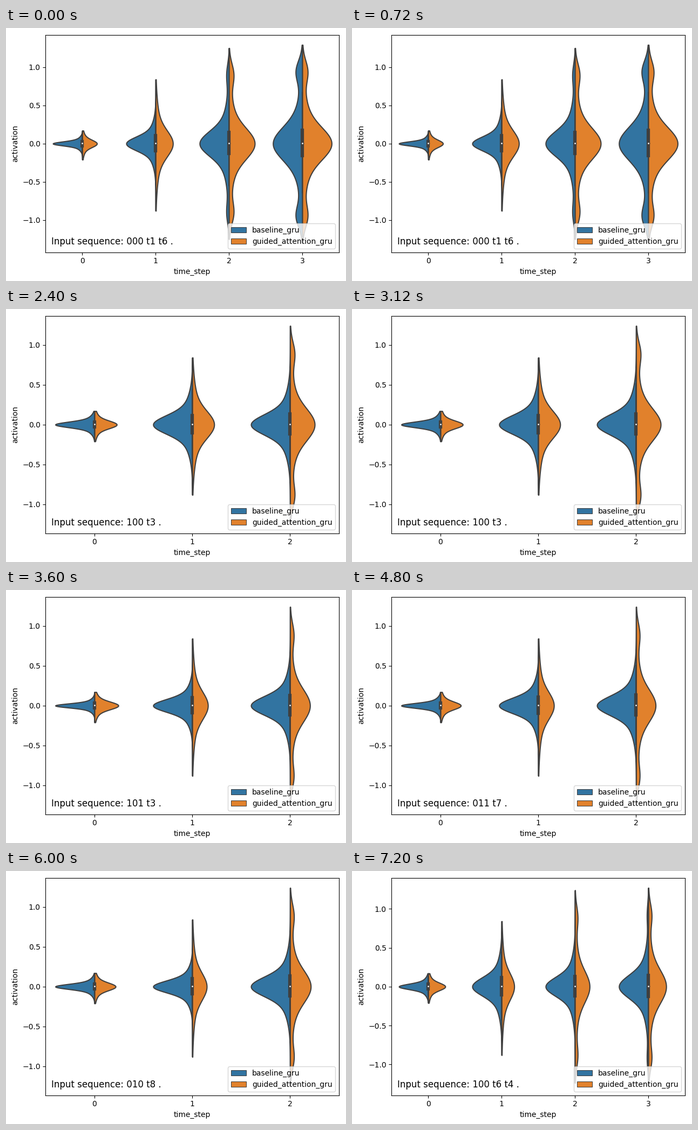
Animation, 630 px wide and 470 px high, one loop 8000 ms. Source, as a matplotlib script:

```python
import numpy as np
import matplotlib.pyplot as plt
from matplotlib.animation import FuncAnimation
from matplotlib.patches import Patch

W, H, DPI = 630, 470, 100
LEFT, RIGHT, BOTTOM, TOP = 73.4, 617, 53.45, 457
BLUE, ORANGE, GRAY = "#3274a1", "#e1812c", "#3f3f3f"
LINE = 1.5
HALF = 0.4

# Typical reach of the tips and spread of the right half at each time step.
REACH = (0.19, 0.86, 1.238, 1.262)
RIGHT_SD = (0.045, 0.16, 0.19, 0.2)

# Sequence, left spread per step, right width per step (left width is 1).
SCENES = [
    ("000 t1 t6", (0.025, 0.085, 0.155, 0.205), (0.5, 0.59, 0.88, 1)),
    ("011 t4 t7", (0.025, 0.15, 0.19, 0.2), (0.52, 0.57, 0.93, 0.92)),
    ("100 t3", (0.033, 0.11, 0.12), (0.57, 0.56, 0.63)),
    ("101 t3", (0.024, 0.075, 0.11), (0.61, 0.4, 0.51)),
    ("011 t7", (0.028, 0.09, 0.115), (0.52, 0.4, 0.5)),
    ("010 t8", (0.03, 0.07, 0.115), (0.54, 0.37, 0.53)),
    ("100 t6 t4", (0.033, 0.11, 0.115, 0.14), (0.58, 0.43, 0.5, 0.61)),
]

plt.rcParams["font.family"] = "DejaVu Sans"
fig = plt.figure(figsize=(W / DPI, H / DPI), dpi=DPI, facecolor="white")
ax = fig.add_axes([LEFT / W, BOTTOM / H, (RIGHT - LEFT) / W, (TOP - BOTTOM) / H])


def bell(y, sd):
    return np.exp(-0.5 * (y / sd) ** 2)


def density(y, width, sd, lobe, lobe_at):
    """A core on a wider base, with one lobe near each tip."""
    core = 0.7 * bell(y, sd) + 0.3 * bell(y, 2.3 * sd)
    return width * core + lobe * bell(np.abs(y) - lobe_at, 0.14)


def draw_violin(step, left_sd, right_width):
    """Draw one split violin and return how far its tips reach."""
    late = step >= 2
    right_sd = RIGHT_SD[step]
    left_lobe = late * max(0, 2.2 * (left_sd - 0.12))
    right_lobe = late * 0.15 * right_width

    reach = REACH[step] + 0.17 * left_lobe
    drop = 0 if late else 0.02
    lo, hi = -reach - drop, reach - drop
    y = np.linspace(lo, hi, 160)
    left = density(y, 1, left_sd, left_lobe, reach - 0.34)
    right = density(y, right_width, right_sd, right_lobe, reach - 0.34)
    style = dict(edgecolor=GRAY, linewidth=LINE)
    ax.fill_betweenx(y, step - HALF * left, step, facecolor=BLUE, **style)
    ax.fill_betweenx(y, step, step + HALF * right, facecolor=ORANGE, **style)

    spread = left_sd + right_sd
    q1, q3 = -0.38 * spread, 0.43 * spread
    whisker = 1.5 * (q3 - q1)
    ends = max(lo, q1 - whisker), min(hi, q3 + whisker)
    ax.plot([step, step], ends, color=GRAY, lw=LINE)
    ax.plot([step, step], [q1, q3], color=GRAY, lw=3 * LINE)
    ax.scatter(step, 0.003, s=(2 * LINE) ** 2, color="white", edgecolor=GRAY, zorder=3)
    return reach


def draw(i):
    sequence, left_sds, right_widths = SCENES[i // 3]
    steps = range(len(left_sds))
    ax.clear()
    reach = max(map(draw_violin, steps, left_sds, right_widths))

    ax.set_xlim(-0.5, len(steps) - 0.5)
    ax.set_ylim(-1.1 * reach, 1.1 * reach)
    ax.set_xticks(steps)
    ax.set_yticks(np.arange(-1, 1.1, 0.5))
    ax.set_xlabel("time_step")
    ax.set_ylabel("activation")
    ax.text(0.02, 0.035, f"Input sequence: {sequence} .", fontsize=12,
            transform=ax.transAxes)
    names = {"baseline_gru": BLUE, "guided_attention_gru": ORANGE}
    ax.legend(handles=[Patch(facecolor=color, edgecolor=GRAY, linewidth=LINE / 2,
                             label=name) for name, color in names.items()],
              loc="lower right")
    return []


# Scenes hold for three ticks of 400 ms; the last one is cut to two.
anim = FuncAnimation(fig, draw, frames=20, interval=400, repeat=True,
                     repeat_delay=0, init_func=lambda: draw(0))
plt.show()
```
